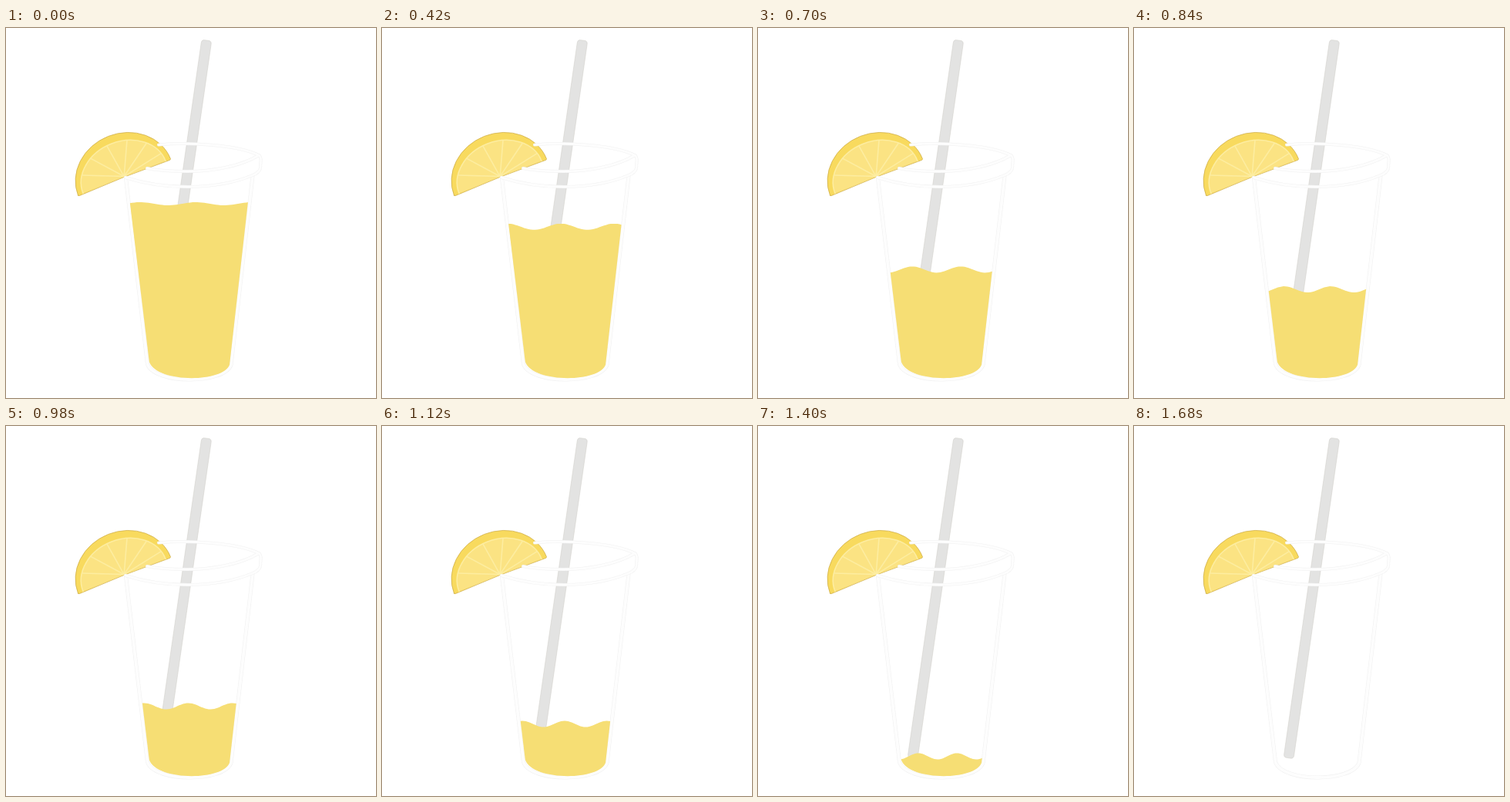
Animation of 480 by 480 pixels, one loop 1.82 s. Source, as an HTML page:

```html
<!DOCTYPE html>
<html lang="en">
<head>
<meta charset="utf-8">
<title>Lemonade</title>
<style>
  html, body { margin: 0; width: 100%; height: 100%; overflow: hidden; background: #fff; }
  svg { display: block; width: 100vw; height: 100vh; }
  path { stroke-linecap: round; stroke-linejoin: round; }
  .edge { fill: none; stroke: #f1f1f1; stroke-width: 5; }
  .glass { fill: none; stroke: #fdfdfd; stroke-width: 3.8; }
  .rim .edge { stroke-width: 4; }
  .rim .glass { stroke-width: 2.9; }
  .pith { fill: none; stroke: #fdeda0; stroke-width: 1.6; }
</style>
</head>
<body>
<svg viewBox="0 0 480 480">
  <defs>
    <clipPath id="inside">
      <path d="M156.7 193 L185.8 433 C195 460.5 281 460.5 290 437 L318 190 Z"/>
    </clipPath>
    <path id="body" d="M155.5 195 L183.5 436 C192 462 282 463 292 437 L320 192"/>
    <path id="lip" d="M198 151.5 C235 148 300 151 328 165 C306 179 268 186 235 186 C215 186 198 185 183 182
      M328 165 Q331 167 330.5 173 L330 182 Q328 188 320 191 C272 211 205 210 155 194"/>
  </defs>

  <rect x="-6.5" width="13" height="419" rx="4" transform="translate(260.3 16) rotate(8.2)"
    fill="#e3e3e2" stroke="#cfcdc9" stroke-width=".5"/>

  <use href="#body" class="edge"/>
  <use href="#body" class="glass"/>
  <g clip-path="url(#inside)"><path id="drink" fill="#f6de74"/></g>

  <g transform="translate(153.5 193.5) rotate(-21.5)">
    <path fill="#f8da5e" stroke="#d0b04e" stroke-width=".7"
      d="M-64.5 0 A64.5 57 0 0 1 64.5 0 Q64 1.5 61 1 Q0 -1.5 -61 1 Q-64 1.5 -64.5 0 Z"/>
    <path fill="#fbe383" d="M-57.5 0 A57.5 46.5 0 0 1 57.5 0 Q0 -1.5 -57.5 0 Z"/>
    <path class="pith" d="M-57.5 0 A57.5 46.5 0 0 1 57.5 0"/>
    <path class="pith" id="spokes"/>
  </g>

  <g class="rim">
    <use href="#lip" class="edge"/>
    <use href="#lip" class="glass"/>
  </g>
</svg>
<script>
  const FIRST = 420, STEP = 140, LOOP = 1820;
  const { PI, sin, cos, min, floor } = Math;
  const drink = document.getElementById('drink');

  // Liquid after a number of sips: the level sinks ever slower, the crest sways.
  function liquid(sips) {
    const level = 228 + 30.5 * sips - .68 * sips ** 2;
    const swell = min(4, 2 + 2 * sips);
    const crest = .58 + .12 * sin(1.4 * sips - 2.97);
    const left = 135 + .119 * level, right = 339 - .1137 * level;
    let d = 'M150 470';
    for (let u = -.05; u <= 1.06; u += .02) {
      const x = left + u * (right - left);
      const y = level - swell * cos(2 * PI * (u - crest) / .48);
      d += `L${x.toFixed(1)} ${y.toFixed(1)}`;
    }
    return d + 'L325 470Z';
  }

  let spokes = '';
  for (let i = 0; i < 6; i++) {
    const a = (29 + 27.4 * i) * PI / 180;
    spokes += `M0 -1L${-57 * cos(a)} ${-46 * sin(a)}`;
  }
  document.getElementById('spokes').setAttribute('d', spokes);

  function draw() {
    const t = performance.now() % LOOP;
    const sips = t < FIRST ? 0 : 1 + floor((t - FIRST) / STEP);
    drink.setAttribute('d', liquid(sips));
    requestAnimationFrame(draw);
  }
  draw();
</script>
</body>
</html>
```
